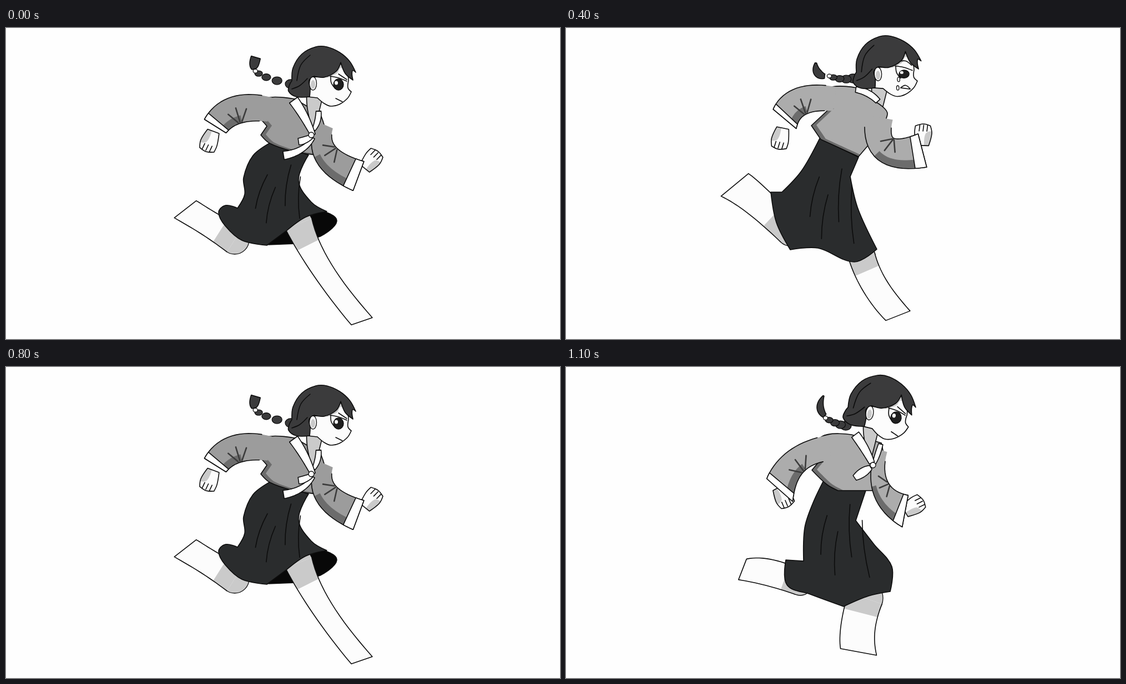
Write an HTML page with a canvas that moves like this. It is 998 px wide and 561 px high and loops after 1.2 s.

```html
<!DOCTYPE html>
<html lang="en">
<head>
<meta charset="utf-8">
<title>Runner</title>
<style>
html, body { margin: 0; height: 100%; overflow: hidden; background: #fefefe; }
canvas { display: block; }
</style>
</head>
<body>
<canvas id="stage" width="998" height="561"></canvas>
<script>
const ctx = document.getElementById('stage').getContext('2d');
const INK = '#0c0c0c', PAPER = '#fefefe', SKIN = '#fcfcfc', SHADE = '#cacaca';
const HAIR = '#3b3b3c', SKIRT = '#2a2c2d', FOLD = '#6c6c6c', CREASE = '#3c3c3c';

const parse = text => text.split(' ').map(s => s.split(',').map(parseFloat));
const mix = (a, b, u) => a + (b - a) * u;

function fill(path, color) {
  ctx.fillStyle = color;
  ctx.fill(path);
}
function ink(path, width = 1.6, color = INK) {
  ctx.lineWidth = width;
  ctx.strokeStyle = color;
  ctx.stroke(path);
}
function oval(x, y, rx, ry, color, edge = true) {
  const path = new Path2D();
  path.ellipse(x, y, rx, ry, 0, 0, 7);
  fill(path, color);
  if (edge) ink(path, 1.3);
}

// Smooth curve through "x,y" points; "!" marks a sharp corner.
function curve(text, closed) {
  const sharp = text.split(' ').map(s => s.endsWith('!')), pts = parse(text), n = pts.length;
  const slope = i => {
    if (sharp[i] || (!closed && (i === 0 || i === n - 1))) return [0, 0];
    const a = pts[(i + n - 1) % n], b = pts[(i + 1) % n];
    const dx = b[0] - a[0], dy = b[1] - a[1], len = Math.hypot(dx, dy) || 1;
    return [dx / len, dy / len];
  };
  const path = new Path2D();
  path.moveTo(...pts[0]);
  for (let i = 0; i < (closed ? n : n - 1); i++) {
    const j = (i + 1) % n, [px, py] = pts[i], [qx, qy] = pts[j], u = slope(i), v = slope(j);
    const k = Math.hypot(qx - px, qy - py) / 3;
    path.bezierCurveTo(px + u[0] * k, py + u[1] * k, qx - v[0] * k, qy - v[1] * k, qx, qy);
  }
  if (closed) path.closePath();
  return path;
}
function shape(color, outline, shadow, area) {
  const path = curve(outline, true);
  fill(path, color);
  if (shadow) {
    ctx.save();
    ctx.clip(path);
    fill(curve(area, true), shadow);
    ctx.restore();
  }
  ink(path);
}
const lines = (...list) => list.forEach(l => ink(curve(l)));

// Bent band through three "x,y,width" points; at(t, s) runs along t and across s.
function band(text, slant = 0) {
  const pts = parse(text);
  const blend = (k, a, b, c) => a * pts[0][k] + b * pts[1][k] + c * pts[2][k];
  const at = (t, s) => {
    const pos = [(2 * t - 1) * (t - 1), 4 * t * (1 - t), t * (2 * t - 1)];
    const vel = [4 * t - 3, 4 - 8 * t, 4 * t - 1];
    const turn = Math.atan2(blend(1, ...vel), blend(0, ...vel)) + Math.PI / 2 + slant * t ** 3;
    const r = s * blend(2, ...pos) / 2;
    return [blend(0, ...pos) + r * Math.cos(turn), blend(1, ...pos) + r * Math.sin(turn)];
  };
  const part = (t0, t1, s0 = 1, s1 = -1, closed = true) => {
    const path = new Path2D(), n = 16;
    for (let i = 0; i <= n; i++) path.lineTo(...at(mix(t0, t1, i / n), s0));
    for (let i = n; i >= 0; i--) path.lineTo(...at(mix(t0, t1, i / n), s1));
    if (closed) path.closePath();
    return path;
  };
  return { pts, at, part };
}
function cloth(text, color = PAPER) {
  const path = band(text).part(0, 1);
  fill(path, color);
  ink(path);
}

function leg(text) {
  const b = band(text, .38), [x, y, w] = b.pts[0];
  oval(x, y, w / 2, w / 2, SHADE);
  fill(b.part(0, 1), SKIN);
  fill(b.part(0, .24), SHADE);
  ink(b.part(0, 1, 1, -1, false));
}

function fist(x, y, turn) {
  ctx.save();
  ctx.translate(x, y);
  ctx.rotate(turn);
  shape(SKIN, '-22,-11! 0,-15 13,-14! 17,0 14,13! 0,16 -22,11!', SHADE, '-25,3! 0,5 5,20! -25,20!');
  for (const k of [-7, 0, 7]) lines(`4,${k} 15,${k + 1}`);
  ctx.restore();
}

// side is where the shadow falls: -1 for the rear arm, 1 for the front arm.
function arm({ sleeve, hand: [x, y], side, slant }, coat) {
  const b = band(sleeve, slant), [ex, ey] = b.pts[2];
  fist(x, y, Math.atan2(y - ey, x - ex));
  fill(b.part(0, 1), coat);
  fill(b.part(.45, 1, side, side * .45), FOLD);
  for (let i = -1; i <= 1; i++) {
    const fold = new Path2D();
    fold.moveTo(...b.at(.5 + .05 * i, -.9));
    fold.lineTo(...b.at(.5 + .17 * i, .15 - .2 * Math.abs(i)));
    ink(fold, 2.6, CREASE);
  }
  ink(b.part(.12, 1, 1, -1, false));
  const cuff = b.part(.9, 1);
  fill(cuff, PAPER);
  ink(cuff);
}

function skirt(outline, hem) {
  shape(SKIRT, outline);
  const [a, b] = parse(outline), [c, d] = parse(hem);
  for (let i = 1; i <= 4; i++) {
    const u = i / 5, from = .2 + .15 * (i % 3), to = .95 - .2 * (i % 2);
    const point = v => [0, 1].map(k => mix(mix(a[k], b[k], u), mix(c[k], d[k], u), v));
    const fold = new Path2D(), mid = point((from + to) / 2);
    fold.moveTo(...point(from));
    fold.quadraticCurveTo(mid[0] - 6, mid[1], ...point(to));
    ink(fold);
  }
}

function torso(outline, coat) {
  const path = curve(outline, true);
  fill(path, FOLD);
  ctx.save();
  ctx.clip(path);
  ctx.translate(9, -1);
  fill(path, coat);
  ctx.restore();
  ink(path);
}

function braid(text, tail) {
  const b = band(text);
  for (let i = 0; i < 4; i++) {
    const [x, y] = b.at(i / 3.3, 0);
    oval(x, y, 10 - i, 8 - i, HAIR);
  }
  cloth(tail, HAIR);
  oval(...b.at(1.1, 0), 4, 3.5, PAPER);
}

// Drawn around the ear.
function head([x, y, turn, size], tears) {
  ctx.save();
  ctx.translate(x, y);
  ctx.rotate(turn);
  ctx.scale(size, size);
  shape(SKIN, '-4,-12! 20,-15 40,-42! 60,-25 64,-5! 63,8 69,15! 62,27 47,38 32,41 20,36 8,26! -10,24! -8,0',
    SHADE, '25,-10! 43,-18 51,-28 60,-15 66,-6! 55,-42! 20,-30!');
  shape(HAIR, '-38,-5! -36,-28 -20,-53 5,-66 25,-66 48,-56 66,-40 77,-20! 71,-23 72,-6! 58,-18 50,-38! 42,-22 20,-11 2,-13! -7,-5 -5,8 -6,24! -30,24 -44,14 -42,2');
  lines('-5,-51 -22,-33 -29,-5', '-38,10 -24,4 -10,-9');
  oval(0, 0, 6.5, 12, SKIN);
  oval(0, 2, 4, 8, SHADE, false);
  lines('31,-13 46,-10 61,-4', '32,-13 33,-1 40,9');
  const ry = 10 - 1.5 * tears;
  oval(46, 2, 9, ry, '#202020');
  oval(42, -1, 3, ry * .36, PAPER, false);
  if (tears) {
    lines('40,-21 50,-21 60,-13', '39,26 48,22 56,29! 39,26');
    for (let i = 0; i < tears; i++) oval(36 - 2 * i, 11 + 15 * i, 2.2, 4, PAPER);
  } else {
    lines('46,-17 61,-7', '41,27 47,30 53,33');
  }
  ctx.restore();
}

function neck([x, y]) {
  cloth(`${x + 4},${y + 16},30 ${x + 1},${y + 46},22 ${x + 1},${y + 82},4`, SHADE);
}

function runner({ coat = '#acacac', tears, back, ...p }) {
  leg(p.legs[0]);
  if (p.lining) shape('#080808', p.lining);
  leg(p.legs[1]);
  skirt(p.skirt, p.hem);
  if (back) neck(p.head);
  torso(p.torso, coat);
  p.arms.forEach(a => arm(a, coat));
  if (!back) neck(p.head);
  p.trim.forEach(t => cloth(t));
  if (p.knot) oval(...p.knot, 5, 5, PAPER);
  braid(p.braid, p.tail);
  head(p.head, tears);
}

const reach = {
  coat: '#9c9c9c', tears: 0, head: [553, 100, 0, 1],
  legs: ['412,382,52 361,350,46 323,327,50', '527,353,51 570,436,38 641,529,40'],
  lining: '473,391! 523,389! 566,376! 596,348 570,330! 500,360!',
  skirt: '476,207! 545,229! 527,275 550,314 578,331! 540,341 505,366! 470,392! 425,383 395,357 383,333 395,320 417,325! 430,300 428,270 445,230',
  hem: '405,368 560,345',
  torso: '520,128! 470,126 440,150! 457,163 470,177! 459,193! 475,208 515,222 557,229! 575,190 566,155!',
  arms: [{ sleeve: '475,147,44 415,148,50 377,177,46', hand: [366, 207], side: -1 },
    { sleeve: '575,175,30 577,228,44 635,267,56', hand: [660, 236], side: 1 }],
  trim: ['563,150,9 561,168,10 554,184,6', '518,130,18 537,160,15 553,193,9', '553,198,7 532,219,11 500,230,15', '550,196,8 538,202,12 527,205,12'],
  knot: [550, 193],
  braid: '513,101,1 475,91,1 452,80,1', tail: '447,74,8 447,66,16 450,53,17'
};
const land = {
  tears: 1, head: [531, 84, .05, .98],
  legs: ['440,395,48 370,379,50 317,369,54', '547,390,56 521,470,46 517,519,54'],
  skirt: '451,205! 526,212! 523,272! 562,340 589,379! 545,392 500,399 440,388 400,376 391,360! 417,350! 418,305 435,262',
  hem: '400,365 560,375',
  torso: '495,114! 460,132 432,178! 438,188! 456,206! 500,215 546,210! 560,170 541,136!',
  arms: [{ sleeve: '465,150,46 410,178,40 381,228,53', hand: [391, 250], side: -1 },
    { sleeve: '550,160,26 554,228,40 610,255,52', hand: [630, 250], side: 1, slant: .2 }],
  trim: ['538,138,8 535,152,9 529,166,5', '498,117,18 514,145,14 527,176,8', '523,188,9 487,224,16 435,247,22', '525,181,8 510,188,16 498,194,18'],
  knot: [525, 180],
  braid: '492,94,1 472,99,1 449,96,1', tail: '437,94,8 427,88,9 417,83,4'
};
const push = {
  tears: 2, back: true, head: [528, 85, -.2, 1],
  legs: ['400,405,48 351,481,45 327,533,57', '562,350,46 520,416,50 492,474,54'],
  skirt: '461,215! 518,237! 519,270! 560,300 585,347! 560,380 510,415 455,425 400,402 375,400! 335,356! 390,308 425,250',
  hem: '360,370 570,350',
  torso: '494,132! 455,154 425,168 412,195 431,240! 461,215! 517,236! 530,200! 556,170 545,145!',
  arms: [{ sleeve: '535,170,44 545,212,46 603,235,58', hand: [620, 208], side: 1 }],
  trim: ['501,132,13 530,132,14 547,158,12'],
  braid: '489,114,1 475,124,1 458,130,1', tail: '448,131,9 436,135,12 419,132,6'
};
const stride = {
  tears: 2, back: true, head: [558, 87, -.04, 1.02],
  legs: ['400,372,50 341,317,55 300,287,64', '529,416,48 553,470,46 594,523,47'],
  skirt: '453,203! 523,237! 508,272! 522,330 556,403! 515,426 450,401 400,404! 375,355 365,300! 385,300! 420,262',
  hem: '395,385 545,405',
  torso: '520,112! 470,112 437,150! 470,150! 438,180! 455,205! 523,236! 540,216! 575,160 555,138!',
  arms: [{ sleeve: '480,132,44 420,136,50 390,168,54', hand: [382, 206], side: -1, slant: .38 },
    { sleeve: '560,165,50 572,222,48 638,225,62', hand: [639, 194], side: 1 }],
  trim: ['518,115,10 540,122,12 558,136,10'],
  braid: '513,95,1 493,96,1 474,92,1', tail: '462,91,8 449,84,14 446,67,3'
};
const pass = {
  tears: 3, head: [547, 83, .13, 1.05],
  legs: ['422,390,44 367,371,48 318,365,40', '539,417,64 526,470,62 527,514,66'],
  skirt: '465,203! 541,220! 522,277! 555,320 587,360 584,405! 545,413 500,432! 440,410 398,393 396,348! 428,350! 430,290 445,245',
  hem: '420,380 580,390',
  torso: '514,122! 460,126 440,172! 457,169! 443,186! 470,212 490,223! 553,223! 572,170 568,137!',
  arms: [{ sleeve: '475,146,46 415,170,46 385,222,62', hand: [393, 237], side: -1, slant: .5 },
    { sleeve: '568,150,22 567,217,32 611,260,58', hand: [629, 249], side: 1, slant: -.25 }],
  trim: ['567,139,8 561,158,9 555,174,6', '521,122,16 537,146,15 551,173,10', '549,181,8 535,190,16 520,200,10'],
  knot: [553, 177],
  braid: '504,106,1 488,102,1 471,94,1', tail: '466,88,8 458,72,12 464,52,2'
};
const calm = { ...pass, tears: 0 };

const shifted = (pose, dx, dy) => ({ ...pose, shift: [dx, dy] });
const cycle = [reach, land, shifted(pass, 0, -3), push, shifted(stride, 4, -4), stride,
  reach, pass, reach, land, shifted(calm, 0, -3), calm];

ctx.lineJoin = ctx.lineCap = 'round';
const start = performance.now();
let shown = -1;
function tick() {
  const step = Math.floor((performance.now() - start) / 100) % cycle.length;
  if (step !== shown) {
    shown = step;
    ctx.fillStyle = PAPER;
    ctx.fillRect(0, 0, 998, 561);
    ctx.save();
    ctx.translate(...(cycle[step].shift || [0, 0]));
    runner(cycle[step]);
    ctx.restore();
  }
  requestAnimationFrame(tick);
}
tick();
</script>
</body>
</html>
```
